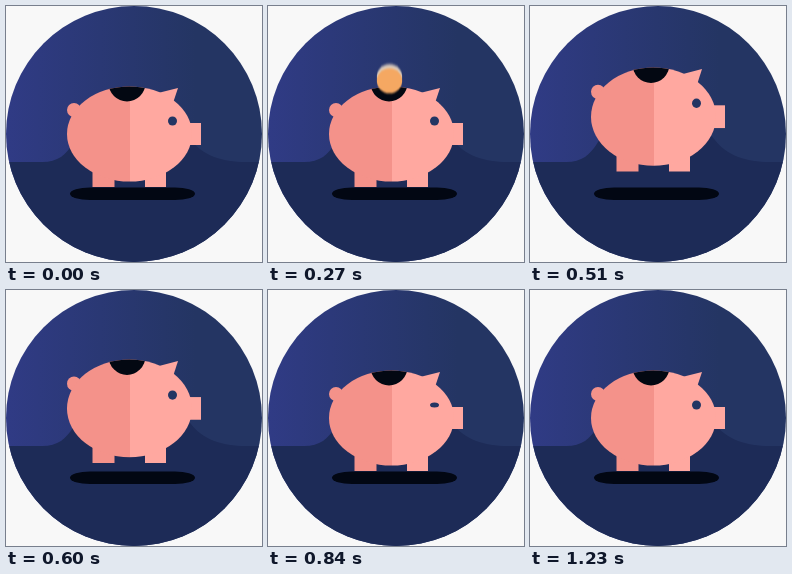
Recreate the animation shown at these times as an HTML page. Size 256x256 px, loop 3230 ms.

```html
<!DOCTYPE html>
<html lang="en">
<head>
<meta charset="utf-8">
<title>Piggy bank</title>
<style>
  html, body { margin: 0; width: 100%; height: 100%; overflow: hidden; background: #f8f8f8; }
  svg { display: block; width: 100vw; height: 100vh; }
</style>
</head>
<body>
<svg viewBox="0 0 256 256">
  <defs>
    <linearGradient id="sky" gradientUnits="userSpaceOnUse" x1="0" y1="0" x2="190" y2="0">
      <stop offset="0" stop-color="#303b85"/>
      <stop offset="1" stop-color="#243563"/>
    </linearGradient>
    <clipPath id="disc"><circle cx="128" cy="128" r="128"/></clipPath>
    <clipPath id="body"><ellipse cx="123.5" cy="128" rx="62.5" ry="47.5"/></clipPath>
    <clipPath id="slot">
      <rect x="100" y="-40" width="42" height="122"/>
      <circle cx="121" cy="77" r="18.5"/>
    </clipPath>
    <filter id="trail" x="-30%" y="-30%" width="160%" height="160%"><feGaussianBlur stdDeviation="0.4 1.6"/></filter>
    <filter id="soft" x="-30%" y="-30%" width="160%" height="160%"><feGaussianBlur stdDeviation="0.4 1.1"/></filter>
  </defs>

  <g clip-path="url(#disc)">
    <rect width="256" height="256" fill="url(#sky)"/>
    <path fill="#1d2b57" d="M0 156H36C52 156 60 149 68 136C85 105 165 105 185 134C196 149 216 156 240 156H256V256H0Z"/>
  </g>
  <rect x="64" y="181.5" width="125" height="12.5" rx="20" ry="6.25" fill="#020713"/>

  <g id="pig">
    <g fill="#f4928a">
      <circle cx="68" cy="104" r="7"/>
      <rect x="86.5" y="160" width="22" height="21"/>
    </g>
    <g fill="#ffa8a0">
      <rect x="139" y="160" width="21" height="21"/>
      <rect x="176" y="117" width="19" height="22"/>
      <path d="M152 87L172 82L167 97Z"/>
    </g>
    <g clip-path="url(#body)">
      <rect x="60" y="80" width="64" height="96" fill="#f4928a"/>
      <rect x="124" y="80" width="63" height="96" fill="#ffa8a0"/>
      <circle cx="121" cy="77" r="18.5" fill="#030812"/>
    </g>
    <ellipse id="eye" cx="166.5" cy="115" rx="4.5" ry="4.5" fill="#233563"/>
  </g>

  <g clip-path="url(#slot)">
    <g id="coin">
      <ellipse cx="121.5" cy="-3.5" rx="12.7" ry="12.5" fill="#fbe6cb" opacity=".85" filter="url(#trail)"/>
      <ellipse cx="121.5" cy="0.5" rx="12.7" ry="12.5" fill="#f5a862" filter="url(#soft)"/>
    </g>
  </g>
</svg>
<script>
const LOOP = 3230, STEP = 30, GROUND = 181;
const [pig, eye, coin] = ["pig", "eye", "coin"].map(id => document.getElementById(id));

// Vertical stretch of the pig: [time, scale]
const stretch = [[340, 1], [420, 0.9], [460, 1], [540, 1.05], [600, 1.03], [620, 1], [660, 0.95], [720, 1]];

function track(keys, t) {
  if (t <= keys[0][0]) return keys[0][1];
  for (let i = 1; i < keys.length; i++) {
    const [a, va] = keys[i - 1], [b, vb] = keys[i];
    if (t < b) {
      const u = (t - a) / (b - a);
      return va + (vb - va) * u * u * (3 - 2 * u);
    }
  }
  return keys[keys.length - 1][1];
}

const jump = t => 18 * Math.max(0, 1 - ((t - 540) / 80.5) ** 2);

// Each blink closes halfway, shuts, then half opens
function eyeOpen(t) {
  for (const mid of [870, 1170]) {
    const d = Math.abs(t - mid);
    if (d < 60) return Math.min(1, 0.12 + d / STEP * 0.44);
  }
  return 1;
}

function draw(ms) {
  const t = Math.floor((ms % LOOP) / STEP) * STEP;
  const s = track(stretch, t);
  pig.setAttribute("transform", `translate(0 ${GROUND - jump(t)}) scale(1 ${s}) translate(0 ${-GROUND})`);
  eye.setAttribute("ry", 4.5 * eyeOpen(t));
  coin.setAttribute("transform", `translate(0 ${18.5 + (t - 120) * 0.372})`);
  coin.setAttribute("visibility", t >= 30 && t < 390 ? "visible" : "hidden");
}

const start = performance.now();
function tick() {
  draw(performance.now() - start);
  requestAnimationFrame(tick);
}
tick();
</script>
</body>
</html>
```
